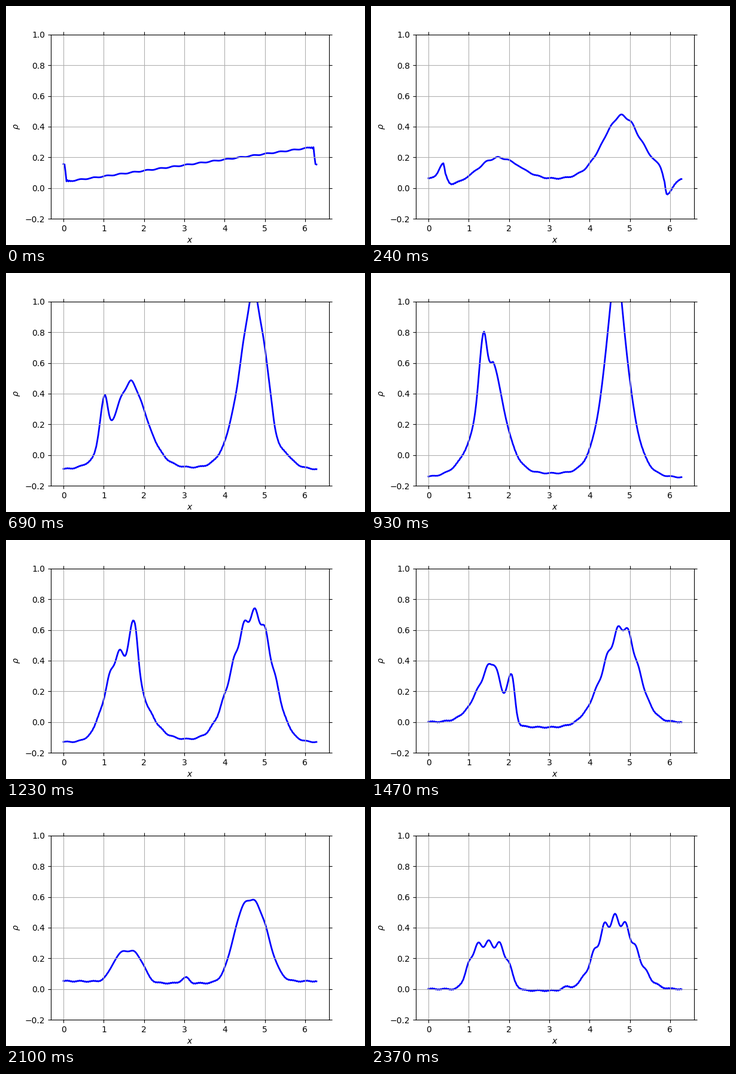
Recreate the animation shown at these times as a matplotlib script. Size 600 px wide and 400 px high, loop 2.4 s.

```python
import numpy as np
import matplotlib.pyplot as plt
from matplotlib.animation import FuncAnimation

FRAMES, STEP = 80, 30
END = 2 * np.pi
SPEED = 1.44e-3      # how fast the two pulses travel, per ms
RIPPLE = .27         # wavelength of the ripples on the humps

x = np.linspace(0, END, 256)
zigzag = (-1.0) ** np.arange(x.size)

# Key moments, and the value of each quantity at them.
times = np.array([0, 480, 930, 1230, 1470, 1830, 2370])
tracks = {
    "edge": [0, -.04, -.145, -.13, 0, .075, 0],
    "middle": [0, -.045, -.12, -.115, -.035, .055, -.01],
    "ripple": [0, .03, 0, .04, -.04, -.07, .08],
    # small hump: height, centre, left and right width, flatness
    "h1": [0, .34, .74, .57, .41, .18, .3],
    "c1": [1.7, 1.7, 1.6, 1.4, 1.6, 1.69, 1.5],
    "l1": [.68, .68, .54, .48, .52, .42, .58],
    "r1": [.75, .75, .41, .72, .29, .33, .58],
    "n1": [2, 2, 1.5, 2, 1.7, 2.2, 4],
    # large hump
    "h2": [0, .76, 1.43, .83, .64, .55, .46],
    "c2": [4.79, 4.79, 4.66, 4.75, 4.83, 4.67, 4.63],
    "l2": [.63, .63, .38, .74, .68, .46, .64],
    "r2": [.62, .62, .39, .61, .52, .48, .68],
    "n2": [1.9, 1.9, 1.4, 2.2, 1.9, 2.5, 2.3],
    # pulses leaving the jump at the ends
    "right": [0, .19, .38, .34, .29, .09, .02],
    "left": [0, .19, 0, 0, 0, 0, 0],
}
rates = {name: np.gradient(np.array(v, float), times)
         for name, v in tracks.items()}


def at(name, t):
    """Cubic interpolation of a track in time."""
    k = min(np.searchsorted(times, t, side="right") - 1, len(times) - 2)
    h = times[k + 1] - times[k]
    u = (t - times[k]) / h
    a, b = tracks[name][k:k + 2]
    ma, mb = rates[name][k:k + 2] * h
    return ((1 + 2 * u) * (1 - u) ** 2 * a + u * (1 - u) ** 2 * ma
            + u * u * (3 - 2 * u) * b + u * u * (u - 1) * mb)


def bell(d, left, right, power=2):
    return np.exp(-np.abs(d / np.where(d < 0, left, right)) ** power)


def hump(t, which):
    height, centre, left, right, power = (at(k + which, t) for k in "hclrn")
    d = x - centre
    wave = 1 + at("ripple", t) * np.cos(2 * np.pi * d / RIPPLE)
    return height * wave * bell(d, left, right, power)


def pulses(t):
    """A crest running right and a trough running left."""
    travel = .02 + SPEED * t
    delay = .07 * np.exp(-((t - 1450) / 200) ** 2)
    crest = bell(x - travel + delay, .15, .11)
    trough = bell(x - (END - travel), .11, .2)
    return at("right", t) * crest - at("left", t) * trough


def ramp(t):
    """Sawtooth whose jump spreads from both ends while it fades."""
    start = .025 + SPEED * t
    inside = (np.clip((x - start) / .05, 0, 1)
              * np.clip((END - start - x) / .05, 0, 1))
    saw = .155 + (.0365 * x - .115) * inside
    return saw * max(0, 1 - t / 480)


def density(t):
    mix = (1 + np.cos(x)) / 2
    rho = at("edge", t) * mix + at("middle", t) * (1 - mix)
    # second, weaker compression of the large hump
    swell = np.sin(np.pi * np.clip((t - 1830) / 330, 0, 1)) ** 2
    rho += hump(t, "1") + hump(t, "2") * (1 + .25 * swell)
    rho += ramp(t) + pulses(t) + .003 * np.sin(19 * x)
    # grid-scale ringing, at the jump first, later in the low parts
    first = np.exp(-t / 60)
    near = np.exp(-np.minimum(np.abs(x - .09), np.abs(x - 6.2)) / .06)
    ring = (.006 * first * near
            + .002 * (1 - first) * np.exp(-(rho / .1) ** 2))
    return rho + zigzag * ring


fig, ax = plt.subplots(figsize=(6, 4), dpi=100)
line, = ax.plot(x, density(0), color="blue", lw=2)
ax.set_xlim(-.05 * END, 1.05 * END)
ax.set_ylim(-.2, 1)
ax.set_xlabel("$x$")
ax.set_ylabel(r"$\rho$")
ax.tick_params(top=True, right=True)
ax.grid(True)
# grid over the curve, frame over the grid
ax.set_axisbelow(False)
for spine in ax.spines.values():
    spine.set_zorder(3)


def update(i):
    line.set_ydata(density(i * STEP))
    return line,


anim = FuncAnimation(fig, update, frames=FRAMES, interval=STEP,
                     repeat=True, repeat_delay=0)
plt.show()
```
